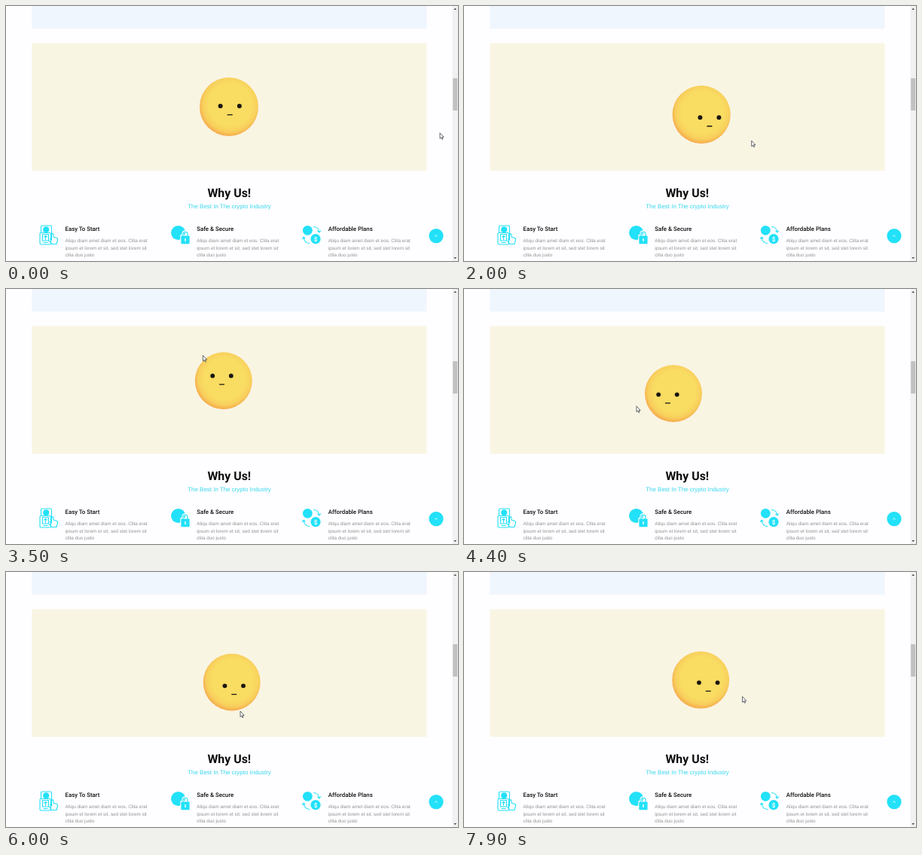
Recreate the animation shown at these times as an HTML page. Size 600 by 339 pixels, loop 8 s.

```html
<!DOCTYPE html>
<html lang="en">
<head>
<meta charset="utf-8">
<title>Why Us</title>
<style>
  html, body { margin: 0; width: 100%; height: 100%; overflow: hidden; background: #fefdff; }
  svg { display: block; width: 600px; height: 339px; }
  text { text-rendering: geometricPrecision; }
  .title { font: 700 15.9px Roboto, sans-serif; fill: #0c0c0c; text-anchor: middle; }
  .sub { font: 7.95px "Liberation Sans", Arial, sans-serif; fill: #36d8ec; text-anchor: middle; }
  .head { font: 500 7.85px Roboto, sans-serif; fill: #111; }
  .body { font: 6.35px "Liberation Sans", Arial, sans-serif; fill: #929292; }
  .fill { fill: #22e1f8; }
  .line { fill: none; stroke: #22e1f8; stroke-width: 1.1; stroke-linejoin: round; stroke-linecap: round; }
  .dollar { font: 700 8px Roboto, sans-serif; fill: #fff; text-anchor: middle; }
</style>
</head>
<body>
<svg viewBox="0 0 600 339">
  <defs>
    <radialGradient id="skin" cx=".52" cy=".46" r=".55">
      <stop offset=".66" stop-color="#f9dc62"/>
      <stop offset=".84" stop-color="#f8d05d"/>
      <stop offset="1" stop-color="#f6a64b"/>
    </radialGradient>
    <g id="copy" class="body">
      <text y="314">Aliqu diam amet diam et eos. Clita erat</text>
      <text y="323.7">ipsum et lorem et sit, sed stet lorem sit</text>
      <text y="333">clita duo justo</text>
    </g>
  </defs>

  <rect width="600" height="339" fill="#fefdff"/>
  <rect x="34.5" width="524" height="30" fill="#f0f6fd"/>
  <rect x="34.5" y="49.5" width="524" height="169.5" fill="#f9f5e3"/>

  <text class="title" x="296.3" y="253.5">Why Us!</text>
  <text class="sub" x="296.5" y="268.8">The Best In The crypto Industry</text>

  <text class="head" x="78.6" y="298.6">Easy To Start</text>
  <text class="head" x="253.2" y="298.6">Safe &amp; Secure</text>
  <text class="head" x="427.8" y="298.6">Affordable Plans</text>
  <use href="#copy" x="78.6"/>
  <use href="#copy" x="253.2"/>
  <use href="#copy" x="427.8"/>

  <!-- phone and hand -->
  <g class="line">
    <path d="M46.5 301V293.5Q46.5 292 48 292H59Q60.5 292 60.5 293.5V304"/>
    <rect x="45" y="301.5" width="14.5" height="15.5" rx="1.5"/>
    <rect x="48.5" y="303.5" width="8" height="8.5"/>
    <path d="M52.5 310.5V305.5M50.8 307L52.5 305.3L54.2 307M50 314.5H55"/>
    <path d="M60.5 304V311L58.5 309.5M60.5 303.5Q62.5 302 63 304V307L67.5 308.5Q69 309 68.5 311L67 316.5H60.5L57.5 312"/>
  </g>
  <circle class="fill" cx="53.2" cy="297.3" r="4"/>

  <!-- coin and padlock -->
  <circle class="fill" cx="228.7" cy="301.5" r="9.6"/>
  <rect x="231.3" y="304.2" width="13" height="13" fill="#fefdff"/>
  <path d="M234.8 307V303Q234.8 299.8 238 299.8T241.2 303V307" fill="none" stroke="#fefdff" stroke-width="3"/>
  <path class="line" d="M235 306V303Q235 300.3 238 300.3T241 303V306"/>
  <rect class="fill" x="232.4" y="305.4" width="11.2" height="10.8" rx=".8"/>
  <path d="M238 309.5V312.5" stroke="#fff" stroke-width="1.4" stroke-linecap="round"/>

  <!-- exchange -->
  <circle class="fill" cx="400.3" cy="298.3" r="6.4"/>
  <circle class="fill" cx="411" cy="309.7" r="6.6"/>
  <text class="dollar" x="411" y="312.5">$</text>
  <path class="line" d="M408.5 293.5Q415 294 415.8 300.5M414 299L415.9 301L417.6 298.8M403 315.5Q396 315 395 307.5M393.4 309.4L395 307.2L397 309"/>

  <circle class="fill" cx="571" cy="305.6" r="9.6"/>
  <path d="M569.3 306.3L571 304.7L572.7 306.3" fill="none" stroke="#fff" stroke-width=".9"/>

  <!-- scrollbar -->
  <rect x="592.5" width="7.5" height="339" fill="#f1f1f1"/>
  <rect x="593.2" y="96" width="6" height="43" fill="#c1c1c1"/>
  <path d="M594.3 5L596.2 2.8L598.1 5ZM594.3 334L596.2 336.2L598.1 334Z" fill="#505050"/>

  <g id="face">
    <circle r="39" fill="url(#skin)"/>
    <g id="looks" fill="#1a1611">
      <circle cx="-12.6" r="3"/>
      <circle cx="12.6" r="3"/>
      <rect x="-3.6" y="11" width="7.2" height="1.3" rx=".4"/>
    </g>
  </g>
  <path id="cursor" d="M0 0V7.6L1.8 6.1L2.9 8.6L4 8.1L2.9 5.6H5.2Z" fill="#fff" stroke="#33363f" stroke-width=".75" stroke-linejoin="round"/>
</svg>
<script>
  const LOOP = 8000, TICK = 100;
  const REST = { x: 296, y: 134 };

  // time, cursor x, cursor y, face x, face y
  const path = [
    [0, 576, 168.7, 296, 134],
    [1000, 576, 168.7, 296, 134],
    [1800, 557, 172, 296, 134],
    [2000, 381.7, 179, 315.2, 144.3],
    [2700, 335, 122, 305, 131],
    [3500, 261.5, 88.3, 288.8, 122],
    [3700, 251, 92, 285, 123],
    [4400, 229, 155.7, 278, 139],
    [4600, 237, 161, 280, 141],
    [5400, 296, 182, 296, 146],
    [6000, 311, 185, 299.7, 146.5],
    [7200, 314, 186, 300.5, 146.5],
    [7400, 337.2, 188.6, 305.5, 148],
    [7900, 369.6, 165.6, 314.2, 143.6]
  ];

  const face = document.getElementById("face");
  const looks = document.getElementById("looks");
  const cursor = document.getElementById("cursor");
  const clamp = v => Math.min(1, Math.max(0, v));

  function poseAt(t) {
    const i = Math.max(1, path.findIndex(k => k[0] >= t));
    const a = path[i - 1], b = path[i];
    const p = clamp((t - a[0]) / (b[0] - a[0]));
    return a.map((v, n) => v + (b[n] - v) * p);
  }

  function place(el, x, y, scale = 1) {
    el.setAttribute("transform", `translate(${x} ${y}) scale(${scale})`);
  }

  function draw(now) {
    const t = Math.floor((now % LOOP) / TICK) * TICK;
    const [, cx, cy, fx, fy] = poseAt(t);
    place(cursor, cx, cy);
    // the face shrinks slightly once hovered
    place(face, fx, fy, 1 - 0.026 * clamp((t - 1800) / 500));
    // eyes and mouth lead the face by half its shift
    place(looks, 1.25 + (fx - REST.x) * 0.5, -1 + (fy - REST.y) * 0.48);
  }

  const start = performance.now();
  function loop() {
    draw(performance.now() - start);
    requestAnimationFrame(loop);
  }
  loop();
</script>
</body>
</html>
```
